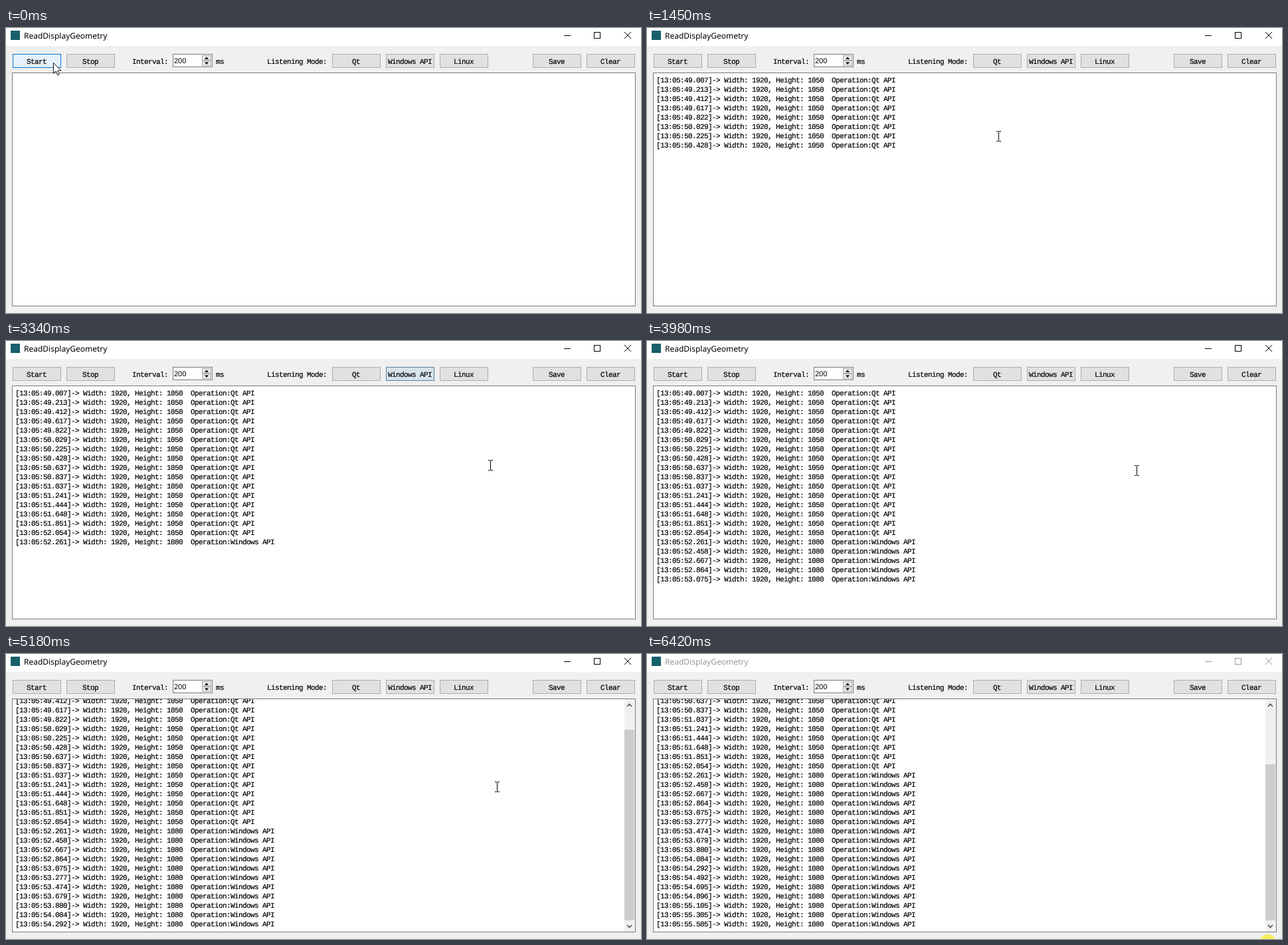
Recreate the animation shown at these times as an HTML page. Size 956 px wide and 429 px high, loop 6.52 s.

```html
<!DOCTYPE html>
<html lang="en">
<head>
<meta charset="utf-8">
<title>ReadDisplayGeometry</title>
<style>
  html, body { margin: 0; width: 100%; height: 100%; overflow: hidden; background: #f0f0f0; }
  svg { display: block; }
  text { font: 11px "Liberation Mono", monospace; letter-spacing: -.6px; white-space: pre;
    text-rendering: geometricPrecision; stroke: #000; stroke-width: .2px; }
  .title, .value { letter-spacing: 0; stroke: none; }
  .title { font: 12px "Noto Sans", sans-serif; }
  .value { font: 11px "Liberation Sans", sans-serif; }
  rect, .crisp { shape-rendering: crispEdges; }
  .line { fill: none; stroke: #000; }
</style>
</head>
<body>
<svg id="stage" width="956" height="429" viewBox="0 0 956 429">
  <defs><clipPath id="view"><rect x="10" y="68" width="937" height="350"/></clipPath></defs>
  <rect width="956" height="429" fill="#f0f0f0"/>
  <rect width="956" height="27" fill="#fff"/>
  <rect x="7" y="4" width="14" height="14" fill="#17606b"/>
  <g id="caption">
    <text class="title" x="27" y="16">ReadDisplayGeometry</text>
    <path class="line crisp" d="M840 11.5h10M885.5 6.5h9v9h-9z"/>
    <path class="line" d="M931 6l10 10m0-10l-10 10"/>
  </g>

  <g id="buttons"></g>
  <text x="190" y="54">Interval:</text>
  <rect x="251.5" y="39.5" width="59" height="19" fill="#fff" stroke="#7a7a7a"/>
  <text class="value" x="253" y="53">200</text>
  <g fill="#e8e8e8" stroke="#acacac">
    <rect x="295.5" y="41.5" width="13" height="7"/>
    <rect x="295.5" y="49.5" width="13" height="7"/>
  </g>
  <path d="M299 47h6l-3-3.5zM299 51.5h6l-3 3.5z"/>
  <text x="316" y="54">ms</text>
  <text x="393" y="54">Listening Mode:</text>

  <rect x="9.5" y="67.5" width="938" height="351" fill="#fff" stroke="#7a7a7a"/>
  <g clip-path="url(#view)"><g id="log"></g></g>
  <g id="scrollbar">
    <rect x="931" y="68" width="16" height="350" fill="#f0f0f0"/>
    <rect id="thumb" x="931" width="15" fill="#cdcdcd"/>
    <path d="M935 79l3.5-3.5 3.5 3.5M935 408l3.5 3.5 3.5-3.5" fill="none" stroke="#505050" stroke-width="1.6"/>
  </g>

  <circle id="click" r="13" fill="#f9ee4a" fill-opacity=".9"/>
  <path id="arrow" d="M.5 .5v16l3.7-3.5 2.6 6 2.5-1.1-2.6-5.8h5.2z" fill="#fff" stroke="#111"/>
  <path id="beam" class="line crisp" d="M-3 -7.5h3m1 0h3M.5 -7v14M-3 7.5h3m1 0h3"/>
</svg>
<script>
const LOOP = 6520, LINE = 14, VIEW = 350, TRACK_END = 401, TRACK = 316;
const $ = id => document.getElementById(id);

function add(parent, tag, attrs, content = '') {
  const node = document.createElementNS('http://www.w3.org/2000/svg', tag);
  for (const key in attrs) node.setAttribute(key, attrs[key]);
  node.textContent = content;
  return parent.appendChild(node);
}

function addButton(x, label) {
  const box = add($('buttons'), 'rect',
    {x: x + .5, y: 39.5, width: 72, height: 20, fill: '#e1e1e1', stroke: '#adadad'});
  add($('buttons'), 'text', {x: x + 36, y: 54, 'text-anchor': 'middle'}, label);
  return box;
}
const startButton = addButton(10, 'Start');
addButton(91, 'Stop');
addButton(491, 'Qt');
const windowsButton = addButton(572, 'Windows API');
addButton(653, 'Linux');
addButton(793, 'Save');
addButton(874, 'Clear');

// Logged clock, in ms after 13:05:00 plus 49 s, and the loop time at which each line shows up.
const stamps = [7, 213, 412, 617, 822, 1029, 1225, 1428, 1637, 1837, 2037, 2241, 2444, 2648, 2851, 3054,
  3261, 3458, 3667, 3864, 4075, 4277, 4474, 4679, 4880, 5084, 5292, 5492, 5695, 5896, 6105, 6305, 6505];
const shownAt = [60, 270, 470, 670, 890, 1090, 1270, 1450, 1690, 1860, 2040, 2220, 2410, 2610, 2790, 2990,
  3190, 3370, 3560, 3780, 3980, 4190, 4390, 4560, 4770, 4970, 5180, 5380, 5570, 5750, 5940, 6150, 6350];
const QT_LINES = 16;

const lines = stamps.map((ms, i) => {
  const clock = (49 + ms / 1000).toFixed(3);
  const result = i < QT_LINES ? '1050  Operation:Qt API' : '1080  Operation:Windows API';
  return add($('log'), 'text', {x: 14, y: 82 + i * LINE},
    `[13:05:${clock}]-> Width: 1920, Height: ${result}`);
});

const easeIn = u => u ** 1.6;
const easeOut = u => 1 - (1 - u) ** 2;
const easeBoth = u => u * u * (3 - 2 * u);
const hold = () => 0;

// time, x, y, easing towards the next point
const path = [
  [0, 71, 52, easeBoth], [90, 71, 54, hold],
  [1090, 71, 54, easeIn], [1450, 528, 163, easeOut], [1690, 681, 172, hold],
  [1770, 681, 172, easeBoth], [2410, 633, 49, hold],
  [3110, 633, 49, easeOut], [3340, 729, 187, easeOut], [3560, 737, 195, hold],
  [4740, 737, 195, easeBoth], [4970, 739, 200, hold],
  [5380, 739, 200, easeBoth], [5940, 880, 440, hold], [LOOP, 880, 440, hold]
];

function pointerAt(t) {
  const next = path.findIndex(point => point[0] > t);
  const [t0, x0, y0, ease] = path[next - 1], [t1, x1, y1] = path[next];
  const u = ease((t - t0) / (t1 - t0));
  return [Math.round(x0 + (x1 - x0) * u), Math.round(y0 + (y1 - y0) * u)];
}

const ramp = (t, from, to) => Math.min(1, Math.max(0, (t - from) / (to - from)));
const blend = (a, b, u) => `rgb(${a.map((v, i) => Math.round(v + (b[i] - v) * u))})`;
const show = (node, visible) => node.setAttribute('visibility', visible ? 'visible' : 'hidden');
const place = (node, x, y) => node.setAttribute('transform', `translate(${x} ${y})`);

const NORMAL = {fill: [225, 225, 225], stroke: [173, 173, 173]};
const HOVER = {fill: [229, 241, 251], stroke: [0, 120, 215]};
const PRESSED = {fill: [204, 228, 247], stroke: [0, 84, 153]};

function paintButton(box, style, amount) {
  for (const key in style) box.setAttribute(key, blend(NORMAL[key], style[key], amount));
}

function drawLog(t) {
  const count = shownAt.filter(time => time <= t).length;
  lines.forEach((line, i) => show(line, i < count));
  const height = count * LINE + 8, scroll = Math.max(0, height - VIEW);
  place($('log'), 0, -scroll);
  show($('scrollbar'), scroll > 0);
  const thumb = Math.round(TRACK * Math.min(1, VIEW / height));
  $('thumb').setAttribute('y', TRACK_END - thumb);
  $('thumb').setAttribute('height', thumb);
}

function drawPointer(t) {
  const [x, y] = pointerAt(t);
  const overText = y >= 68 && y < 418;
  show($('arrow'), !overText);
  show($('beam'), overText);
  place($('arrow'), x, y);
  place($('beam'), x, y);
}

function draw(t) {
  const clicked = t >= 3020, leaving = t >= 6420;
  drawLog(t);
  drawPointer(t);
  paintButton(startButton, HOVER, 1 - ramp(t, 1120, 1440));
  paintButton(windowsButton, clicked ? PRESSED : HOVER, ramp(t, 2290, 2410) - ramp(t, 3140, 3560));
  show($('click'), clicked && t < 3110 || leaving);
  place($('click'), leaving ? 934.5 : 633, leaving ? 435 : 50);
  $('caption').setAttribute('opacity', leaving ? .4 : 1);
}

const begin = performance.now();
function tick() {
  draw((performance.now() - begin) % LOOP);
  requestAnimationFrame(tick);
}
tick();
</script>
</body>
</html>
```
